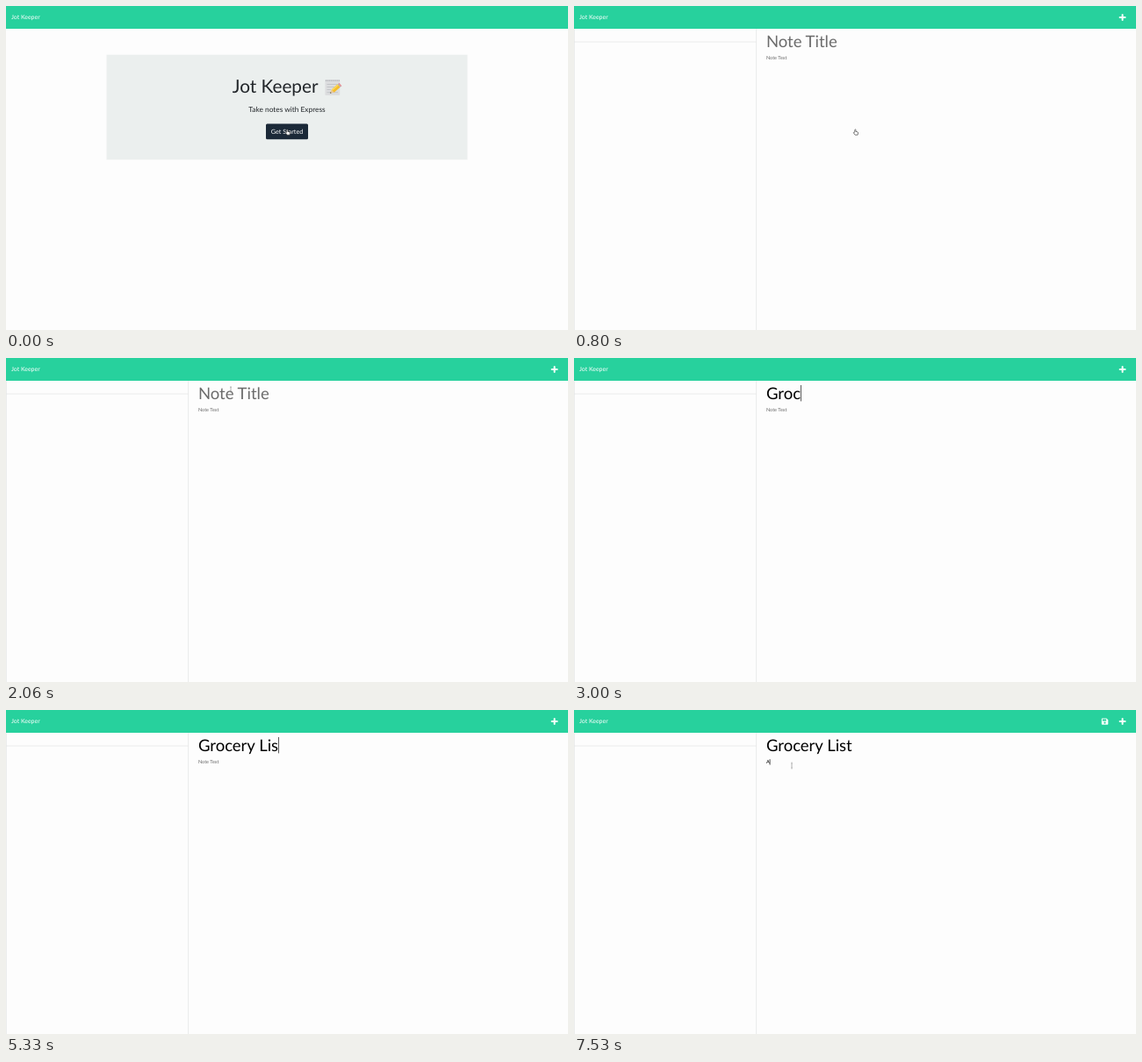
An HTML page for the animation above (8000 ms loop, 640 by 370 pixels).

```html
<!DOCTYPE html>
<html lang="en">
<head>
<meta charset="utf-8">
<title>Jot Keeper</title>
<style>
  html, body { margin: 0; width: 100%; height: 100%; overflow: hidden; background: #fdfdfd; }
  svg { display: block; width: 640px; height: 370px; }
  text { font-family: Lato, sans-serif; white-space: pre; text-rendering: geometricPrecision; }
  .mid { text-anchor: middle; }
  .brand { font-size: 6.94px; fill: #fff; }
  .h1 { font-size: 20.74px; fill: #212529; }
  .lead { font-size: 8.33px; fill: #212529; }
  .btn { font-size: 7.25px; fill: #fff; }
  #title { font-size: 18.52px; }
  #body { font-size: 5.55px; }
  .rule { fill: none; stroke: #e5e6e6; stroke-width: .8; }

  .home, .notes, .save, .hand, .beam { animation: 8s step-end infinite; }
  .home { animation-name: home; }
  .notes { animation-name: notes; }
  .save { animation-name: save; }
  .hand { animation-name: hand; }
  .beam { animation-name: beam; }
  .ring { animation: ring 8s linear infinite; }
  .move { animation: move 8s linear infinite; }

  @keyframes home { 0% { opacity: 1 } 9.85%, 100% { opacity: 0 } }
  @keyframes notes { 0% { opacity: 0 } 9.85%, 100% { opacity: 1 } }
  @keyframes save { 0% { opacity: 0 } 93%, 100% { opacity: 1 } }
  @keyframes hand { 0% { opacity: 1 } 14%, 100% { opacity: 0 } }
  @keyframes beam { 0% { opacity: 0 } 14% { opacity: 1 } 29.8% { opacity: 0 } 74.8%, 100% { opacity: 1 } }
  @keyframes ring { 0%, 5.5% { opacity: 0 } 7.4%, 100% { opacity: 1 } }
  @keyframes move {
    0%, 14% { transform: translate(319px, 138px); animation-timing-function: ease-in-out; }
    19% { transform: translate(258px, 31px); }
    22.3%, 74.8% { transform: translate(256px, 36px); }
    78.2%, 79.8% { transform: translate(253px, 68px); }
    80.7%, 100% { transform: translate(248px, 63.5px); }
  }
</style>
</head>
<body>
<svg viewBox="0 0 640 370">
  <rect width="640" height="370" fill="#fdfdfd"/>
  <rect width="640" height="26" fill="#27d19d"/>
  <text class="brand" x="6" y="15.4">Jot Keeper</text>

  <g class="home">
    <rect x="114.5" y="55.7" width="411" height="119.8" fill="#ebefee"/>
    <text class="h1" x="257.8" y="99.3">Jot Keeper</text>
    <g class="memo">
      <rect x="363.4" y="84" width="16.8" height="18" rx=".8" fill="#dcdddf"/>
      <path d="M364 85.2H380" stroke="#aeb1b5" stroke-width="1.6" stroke-dasharray="1 .9"/>
      <path d="M365.5 89.5H377M365.5 92.5H374M365.5 95.5H370M365.5 98.7H378" stroke="#b9bcc0" stroke-width=".7"/>
      <path d="M369 99.8L370.6 95.4L373.6 98.8Z" fill="#e9c99a"/>
      <path d="M369 99.8L369.6 98.2L370.6 99.3Z" fill="#333"/>
      <path d="M372.1 97.1L379.2 91" stroke="#f5bd2c" stroke-width="4.4"/>
      <path d="M371.3 96.1L378.4 90" stroke="#fbd95f" stroke-width="1.5"/>
      <path d="M379.2 91L380 90.3" stroke="#a9adb1" stroke-width="4.4"/>
      <path d="M380 90.3L380.9 89.5" stroke="#e88a92" stroke-width="4.4"/>
    </g>
    <text class="lead mid" x="320" y="120.8">Take notes with Express</text>
    <rect class="ring" x="295.2" y="133.8" width="49.6" height="19.2" rx="2.2" fill="#8c99a5"/>
    <rect x="296" y="134.6" width="48" height="17.6" rx="1.5" fill="#1b2938"/>
    <text class="btn mid" x="320" y="145.8">Get Started</text>
  </g>

  <g class="notes">
    <path class="rule" d="M.4 26V370M0 41H207.6M207.6 26V370"/>
    <path d="M624.6 10V16M621.6 13H627.6" stroke="#f4fffa" stroke-width="2" stroke-linecap="round"/>
    <path class="save" fill="#f4fffa" fill-rule="evenodd"
      d="M601.6 9.4H606.4L608.3 11.3V16Q608.3 16.8 607.5 16.8H601.6Q600.8 16.8 600.8 16V10.2Q600.8 9.4 601.6 9.4Z
         M601.9 10.5V12.4H606.1V10.5Z M603.4 14.6a1.1 1.1 0 1 0 2.2 0a1.1 1.1 0 1 0 -2.2 0Z"/>
    <text id="title" x="218.9" y="47.2"></text>
    <text id="body" x="218.9" y="61.1"></text>
    <rect id="caret" width=".8"/>
  </g>

  <path class="hand" transform="translate(321 144)" fill="#fff" stroke="#333" stroke-width=".65" stroke-linejoin="round"
    d="M-1.2 0V-2.6q.6-.9 1.2 0V-.6l2 .5q.7.3.5 1.1l-.4 2.2h-3l-1.8-2.4q-.1-.9 1-.4z"/>
  <g class="move">
    <path class="beam" d="M-1-3.2Q0-3.2 0-2.4Q0-3.2 1-3.2M0-2.4V2.4M-1 3.2Q0 3.2 0 2.4Q0 3.2 1 3.2"
      fill="none" stroke="#777" stroke-width=".55"/>
  </g>
</svg>
<script>
  const LOOP = 8000, LEFT = 218.9;
  const title = document.getElementById('title');
  const body = document.getElementById('body');
  const caret = document.getElementById('caret');

  // [time, text]: each entry holds until the next
  const titleKeys = [
    [0, ''], [2385, 'G'], [2645, 'Gr'], [2785, 'Gro'], [2985, 'Groc'], [3245, 'Groce'],
    [3385, 'Grocer'], [3645, 'Grocery'], [3845, 'Grocery '], [4315, 'Grocery L'],
    [4785, 'Grocery Lo'], [5045, 'Grocery L'], [5245, 'Grocery Li'],
    [5315, 'Grocery Lis'], [5585, 'Grocery List']
  ];
  const bodyKeys = [[0, ''], [7445, 'A']];
  // [time, field holding the visible caret]
  const caretKeys = [
    [0, null], [1515, title], [2045, null], [2385, title],
    [6185, body], [6785, null], [7245, body]
  ];

  const at = (keys, t) => keys.findLast(k => k[0] <= t)[1];

  function fill(field, typed, hint) {
    const text = typed || hint;
    if (field.textContent !== text) field.textContent = text;
    field.setAttribute('fill', typed ? '#000' : '#6b6b6b');
    field.typed = typed;
  }

  function placeCaret(field) {
    caret.setAttribute('visibility', field ? 'visible' : 'hidden');
    if (!field) return;
    const big = field === title;
    const width = field.typed ? field.getComputedTextLength() : 0;
    caret.setAttribute('x', LEFT + width);
    caret.setAttribute('y', big ? 31 : 56.2);
    caret.setAttribute('height', big ? 18.4 : 6.4);
    caret.setAttribute('fill', big ? '#333' : '#222');
  }

  let start;
  function draw(now) {
    start ??= now;
    const t = (now - start) % LOOP;
    fill(title, at(titleKeys, t), 'Note Title');
    fill(body, at(bodyKeys, t), 'Note Text');
    placeCaret(at(caretKeys, t));
    requestAnimationFrame(draw);
  }
  requestAnimationFrame(draw);
</script>
</body>
</html>
```
